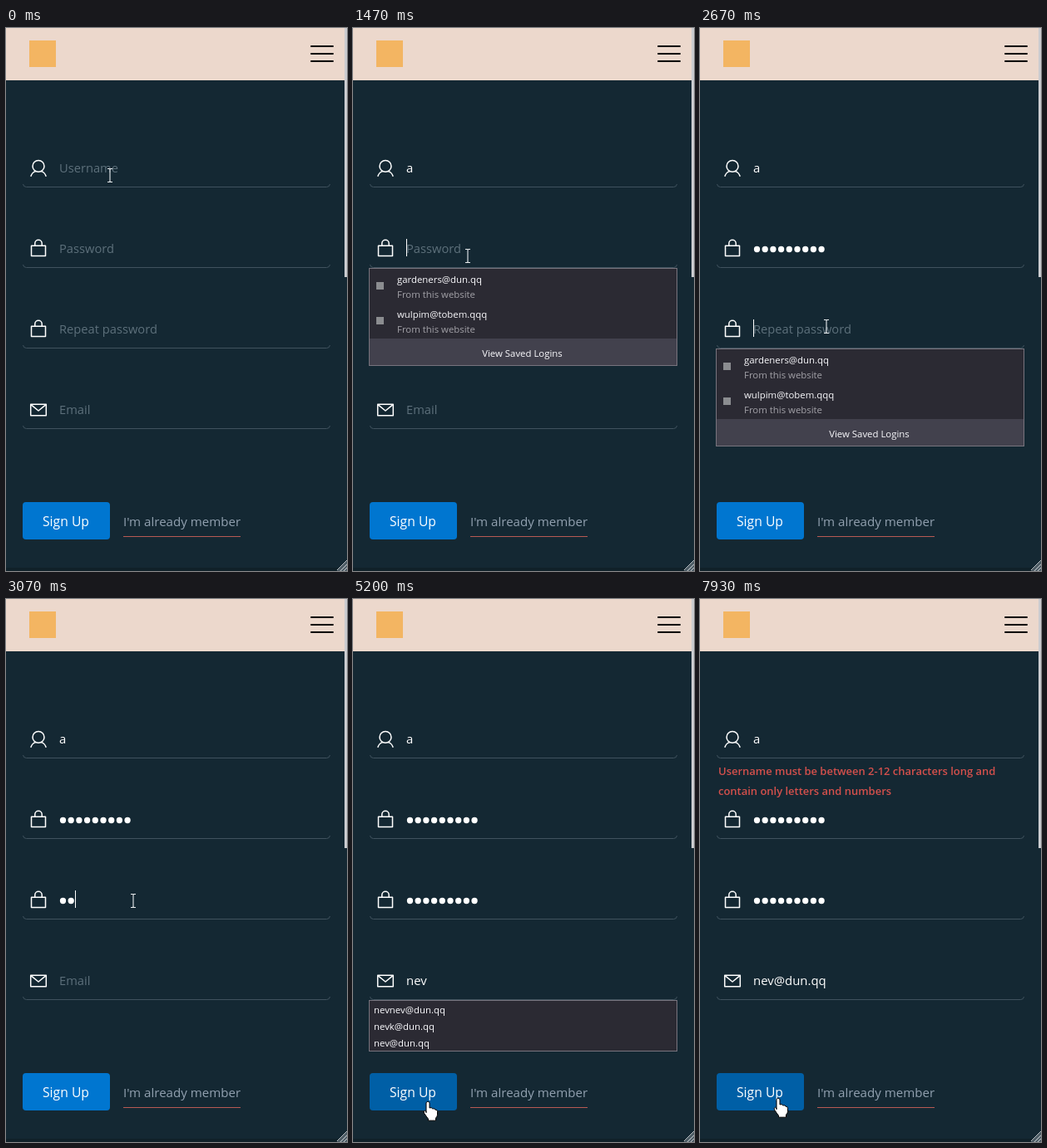
An HTML page for the animation above (8 s loop, 410 by 654 pixels).

```html
<!DOCTYPE html>
<html lang="en">
<head>
<meta charset="utf-8">
<title>Sign up form</title>
<style>
  html, body { margin: 0; width: 100%; height: 100%; overflow: hidden; background: #142833; }
  svg { display: block; font-family: "Open Sans", "Noto Sans", sans-serif; }
  text { white-space: pre; }
  .hint { font-size: 14.7px; fill: #5d707b; }
  .value { font-size: 14.9px; fill: #fff; }
  .icon { fill: none; stroke: #fff; stroke-width: 1.5; stroke-linejoin: round; stroke-linecap: round; }
  .line { fill: none; stroke: #40525e; }
  .dots { stroke: #fff; stroke-width: 7.3; stroke-linecap: round; stroke-dasharray: 0 9.7; fill: none; }
  .popup { font-size: 11.4px; fill: #fbfbfe; }
  .popup .panel { fill: #2b2a33; stroke: #78747e; }
  .popup .dim { fill: #a3a2a8; }
  .error { font-size: 12.97px; font-weight: 600; fill: #d4504c; }
</style>
</head>
<body>
<svg width="410" height="654" viewBox="0 0 410 654">
  <rect width="410" height="654" fill="#142833"/>
  <rect y="650" width="410" height="4" fill="#102129"/>
  <rect width="410" height="63" fill="#ecd8cc"/>
  <rect x="28" y="15" width="32" height="32" fill="#f3b562"/>
  <path d="M367 22h26M367 31h26M367 40h26" stroke="#000" stroke-width="2" stroke-linecap="round"/>
  <rect x="407" width="3" height="300" fill="#cbccd0"/>
  <path d="M398 654L410 642V654z" fill="#52616a"/>
  <path d="M398 653L410 641M402 654L410 646M406 654L410 650" stroke="#c8ccd0"/>

  <g id="fields"></g>

  <rect id="button" x="20" y="571" width="105" height="45" rx="4"/>
  <text x="44" y="600" font-size="15.7" fill="#fff">Sign Up</text>
  <text x="141" y="600" font-size="15.1" fill="#92a1b0">I'm already member</text>
  <path d="M141 612.5h141" stroke="#b85a54"/>

  <g id="error" class="error">
    <text x="22" y="212">Username must be between 2-12 characters long and</text>
    <text x="22" y="236">contain only letters and numbers</text>
  </g>
  <rect id="caret" width="1" height="21" fill="#fff"/>

  <g id="logins" class="popup">
    <rect class="panel" x="19.5" y=".5" width="370" height="117"/>
    <rect id="footer" x="20" y="85" width="369" height="32"/>
    <rect x="28" y="17" width="9" height="9" fill="#8b8d90"/>
    <text x="53" y="18">gardeners@dun.qq</text>
    <text x="53" y="36" class="dim">From this website</text>
    <rect x="28" y="59" width="9" height="9" fill="#8b8d90"/>
    <text x="53" y="60">wulpim@tobem.qqq</text>
    <text x="53" y="78" class="dim">From this website</text>
    <text x="203.5" y="107" text-anchor="middle">View Saved Logins</text>
  </g>
  <g id="emails" class="popup">
    <rect class="panel" x="19.5" y="483.5" width="370"/>
    <text x="25" y="499"></text>
    <text x="25" y="519"></text>
    <text x="25" y="539"></text>
  </g>

  <g id="pointer">
    <path id="beam" d="M-3 -7.5h2.3l.7 .7 .7-.7H3M0-7V8M-3 8.5h2.3l.7-.7 .7 .7H3" fill="none" stroke="#e8ecee" stroke-width="1.1"/>
    <path id="arrow" d="M0 0V17l4-4 3 6.2 2.6-1.2-3-6H12z" fill="#fff" stroke="#000"/>
    <path id="hand" d="M-2 1.5Q0-1.5 2 1.5V8q3-1.5 3.5 1 3-1 3.5 1.2 2.5-.5 2.5 2v4q0 2-2 4v3H.5v-2q-2-2.5-5-7-1-2.5 1-3 1.5 0 1.5 2.5z" fill="#fff" stroke="#000"/>
  </g>
</svg>
<script>
const LOOP = 8000, PITCH = 9.7, EMAIL = "nev@dun.qq";
const $ = id => document.getElementById(id);
const show = (node, on) => node.setAttribute("visibility", on ? "visible" : "hidden");
const between = (t, from, to) => t >= from && t < to;
const countUntil = (times, t) => times.filter(at => at <= t).length;

const lock = "M30.5 -8.8h17v12.3h-17zM34.8 -8.8v-2.7a4.2 4.2 0 0 1 8.4 0v2.7";
const fields = [
  { y: 174, hint: "Username", icon: "M39 -14.5a7 6.9 0 1 1 0 13.8a7 6.9 0 1 1 0-13.8M30 4.2q1.5-4.5 5.5-5.6M48 4.2q-1.5-4.5-5.5-5.6",
    focus: [530, 1400], keys: [800] },
  { y: 271, hint: "Password", icon: lock, secret: true,
    focus: [1400, 2600], keys: [1670, 1800, 1870, 1930, 2070, 2130, 2200, 2330, 2400] },
  { y: 368, hint: "Repeat password", icon: lock, secret: true,
    focus: [2600, 3930], keys: [2930, 3070, 3130, 3200, 3270, 3330, 3400, 3530, 3600] },
  { y: 465, hint: "Email", icon: "M29.7 -11.7h18.6v13.4h-18.6zM30 -11.4l9 7.4 9-7.4",
    focus: [3930, 7730], keys: [4200, 4330, 4400, 5670, 5870, 6000, 6130, 6200, 6330, 6470] }
];

$("fields").innerHTML = fields.map(f => `<g transform="translate(0 ${f.y})">
  <path class="icon" d="${f.icon}"/>
  <path class="line" d="M20.5 14q.5 3.5 4 3.5h361q3.5 0 4-3.5"/>
  <text class="hint" x="64">${f.hint}</text>
  ${f.secret ? '<path class="dots"/>' : '<text class="value" x="64"></text>'}</g>`).join("");
fields.forEach((f, i) => {
  const group = $("fields").children[i];
  f.hintNode = group.querySelector(".hint");
  f.valueNode = group.querySelector(".dots, .value");
});

// time, x, y
const path = [
  [0, 125, 177], [70, 125, 177], [200, 126, 179], [530, 126, 179], [870, 128, 281],
  [1300, 130, 285], [1470, 138, 274], [2070, 140, 272], [2270, 140, 272], [2700, 152, 360],
  [3070, 153, 363], [3600, 153, 363], [3900, 122, 470], [4470, 122, 470], [4870, 93, 606],
  [5200, 90, 605], [5600, 90, 605], [6100, 103, 597], [6870, 103, 597], [7200, 96, 606],
  [7600, 94, 601], [LOOP, 94, 601]
];
const ease = p => p * p * (3 - 2 * p);

function pointerAt(t) {
  const i = path.findIndex(p => p[0] > t);
  const [t0, x0, y0] = path[i - 1], [t1, x1, y1] = path[i];
  const p = ease((t - t0) / (t1 - t0));
  return [x0 + (x1 - x0) * p, y0 + (y1 - y0) * p];
}

function drawField(f, t) {
  const n = countUntil(f.keys, t);
  let end = 64;
  show(f.hintNode, !n);
  show(f.valueNode, n);
  if (f.secret) {
    f.valueNode.setAttribute("d", `M68.5 -4.5h${Math.max(0, n - 1) * PITCH + .1}`);
    end += n * PITCH;
  } else {
    f.valueNode.textContent = (f.hint === "Email" ? EMAIL : "a").slice(0, n);
    if (n) end += f.valueNode.getComputedTextLength();
  }
  if (between(t, ...f.focus)) {
    const lastKey = Math.max(f.focus[0], ...f.keys.filter(k => k <= t));
    const away = between(t, 5130, 5600) || between(t, 6730, 7200);
    $("caret").setAttribute("x", Math.round(end));
    $("caret").setAttribute("y", f.y - 17);
    show($("caret"), !away && (t - lastKey) % 1000 < 500);
  }
}

function drawEmails(t) {
  const rows = t < 5670 ? ["nevnev@dun.qq", "nevk@dun.qq", EMAIL] : ["nevnev@dun.qq", EMAIL];
  const [panel, ...lines] = $("emails").children;
  panel.setAttribute("height", rows.length * 20 + 1);
  lines.forEach((line, i) => line.textContent = rows[i] || "");
  show($("emails"), between(t, 4200, 7730));
}

function draw(t) {
  show($("caret"), false);
  fields.forEach(f => drawField(f, t));

  const [x, y] = pointerAt(t);
  const top = t < 1400 ? 192 : t < 2600 ? 289 : 386;
  const open = between(t, 600, 1400) || between(t, 1470, 1670) || between(t, 2670, 2930);
  show($("logins"), open);
  $("logins").setAttribute("transform", `translate(0 ${top})`);
  const onPopup = open && between(y, top, top + 118);
  $("footer").setAttribute("fill", onPopup && y > top + 85 ? "#7d7882" : "#42414d");
  drawEmails(t);

  const onButton = y > 571;
  const onEmails = between(t, 4200, 7730) && between(y, 483, 546);
  const onField = [191, 288, 385, 482].some(line => between(y, line - 46, line + 1));
  const kind = onButton ? "hand" : onPopup || onEmails || !onField ? "arrow" : "beam";
  ["beam", "arrow", "hand"].forEach(id => show($(id), id === kind));
  $("pointer").setAttribute("transform", `translate(${Math.round(x)} ${Math.round(y)})`);
  $("button").setAttribute("fill", onButton ? "#005fa6" : "#0076d0");
  show($("error"), t >= 7870);
}

function tick() {
  draw(performance.now() % LOOP);
  requestAnimationFrame(tick);
}
tick();
</script>
</body>
</html>
```
